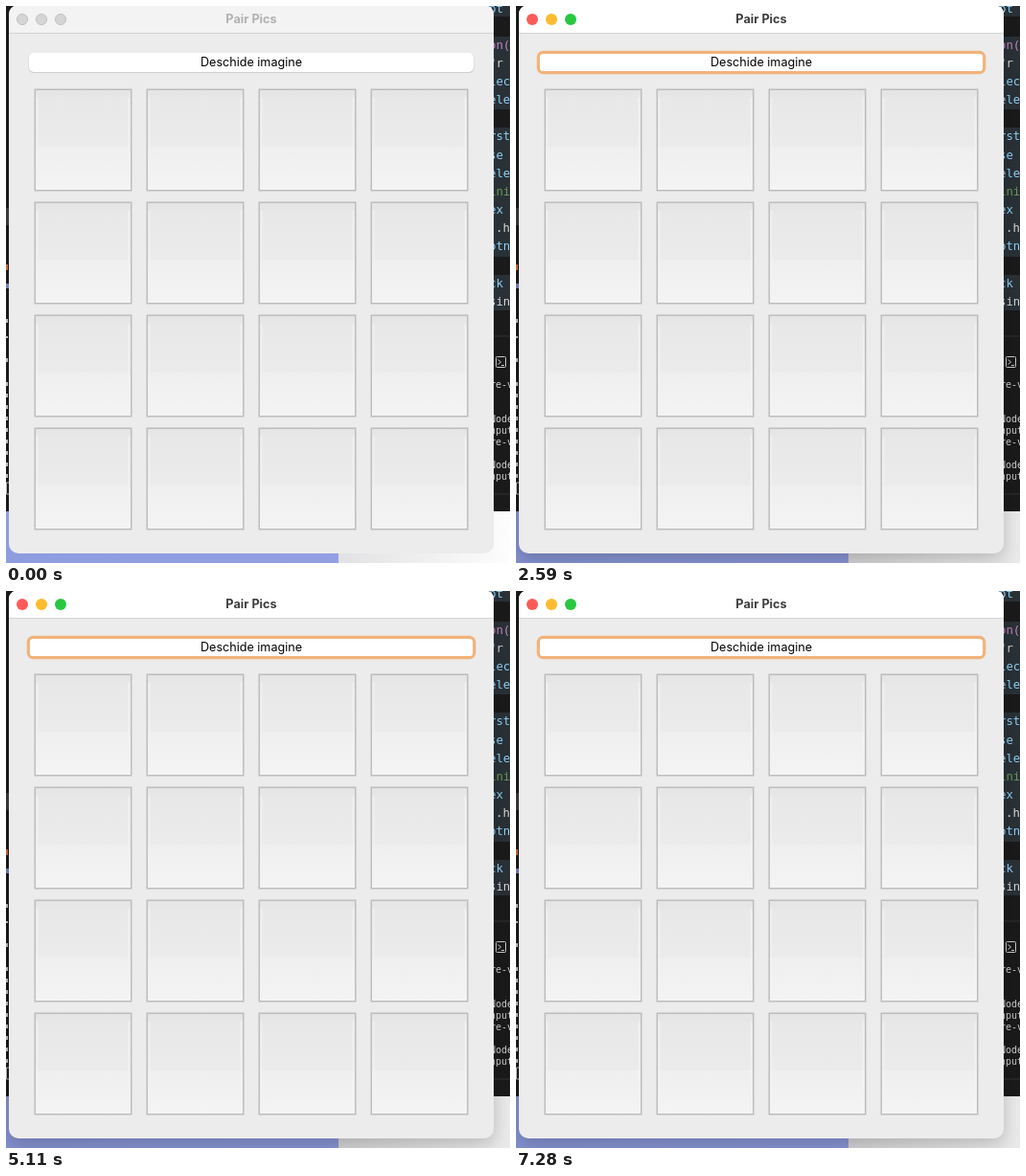
An HTML page for the animation above (7.63 s loop, 526 by 582 pixels).

```html
<!DOCTYPE html>
<html lang="ro">
<head>
<meta charset="utf-8">
<title>Pair Pics</title>
<style>
  html, body { margin: 0; width: 100%; height: 100%; overflow: hidden; background: #1a1a1b; }
  svg { display: block; }
  text { white-space: pre; }
  .ui { font-family: Inter, "Liberation Sans", sans-serif; text-anchor: middle; }
  .code { font: 12.3px "DejaVu Sans Mono", "Noto Sans Mono", monospace; }
  .term { font: 10px "DejaVu Sans Mono", "Noto Sans Mono", monospace; fill: #d0d0d0; }
  .cue { opacity: 0; }
</style>
</head>
<body>
<svg width="526" height="582" viewBox="0 0 526 582">
  <defs>
    <linearGradient id="face" x2="0" y2="1">
      <stop offset="0" stop-color="#e4e4e4"/>
      <stop offset=".1" stop-color="#e8e8e8"/>
      <stop offset=".56" stop-color="#ebebeb"/>
      <stop offset=".57" stop-color="#efefef"/>
      <stop offset=".76" stop-color="#f1f1f1"/>
      <stop offset="1" stop-color="#f4f4f4"/>
    </linearGradient>
    <linearGradient id="desk">
      <stop offset="0" stop-color="#8e9ce0"/>
      <stop offset="1" stop-color="#929fe3"/>
    </linearGradient>
    <linearGradient id="page">
      <stop offset="0" stop-color="#e2e2e4"/>
      <stop offset="1" stop-color="#fdfdfd"/>
    </linearGradient>
    <filter id="soft" x="-10%" y="-10%" width="120%" height="120%">
      <feGaussianBlur stdDeviation="9"/>
    </filter>
    <filter id="water" x="0" y="0" width="1" height="1" color-interpolation-filters="sRGB">
      <feTurbulence type="turbulence" baseFrequency=".034 .042" numOctaves="3" seed="8"/>
      <feColorMatrix values="1 0 0 0 0  1 0 0 0 0  1 0 0 0 0  0 0 0 0 1"/>
      <feComponentTransfer>
        <feFuncR type="table" tableValues=".14 .12 .11 .11 .11 .12"/>
        <feFuncG type="table" tableValues=".42 .26 .19 .17 .16 .16"/>
        <feFuncB type="table" tableValues=".47 .36 .3 .28 .27 .27"/>
      </feComponentTransfer>
    </filter>
    <filter id="stone" x="0" y="0" width="1" height="1" color-interpolation-filters="sRGB">
      <feTurbulence type="fractalNoise" baseFrequency=".07" numOctaves="4" seed="5"/>
      <feColorMatrix values="1 0 0 0 0  1 0 0 0 0  1 0 0 0 0  0 0 0 0 1"/>
      <feComponentTransfer>
        <feFuncR type="linear" slope=".46" intercept=".19"/>
        <feFuncG type="linear" slope=".42" intercept=".115"/>
        <feFuncB type="linear" slope=".38" intercept=".09"/>
      </feComponentTransfer>
    </filter>
    <filter id="grain" x="0" y="0" width="1" height="1" color-interpolation-filters="sRGB">
      <feTurbulence type="fractalNoise" baseFrequency=".025 .14" numOctaves="2" seed="3"/>
      <feColorMatrix values="1 0 0 0 0  1 0 0 0 0  1 0 0 0 0  0 0 0 0 1"/>
      <feComponentTransfer>
        <feFuncR type="linear" slope=".2" intercept=".5"/>
        <feFuncG type="linear" slope=".2" intercept=".455"/>
        <feFuncB type="linear" slope=".17" intercept=".325"/>
      </feComponentTransfer>
    </filter>
    <clipPath id="frame"><rect width="114" height="114"/></clipPath>

    <g id="tile">
      <rect x=".75" y=".75" width="100.5" height="105.5" fill="url(#face)" stroke="#bdbdbd" stroke-width="1.5"/>
      <path d="M3 9V104M99 9V104" stroke="#f3f3f3" stroke-width="2" opacity=".7"/>
    </g>
    <g id="press">
      <rect x=".75" y=".75" width="100.5" height="105.5" fill="#c1c1c1" stroke="#b0b0b0" stroke-width="1.5"/>
      <rect x="2" y="2" width="98" height="95" rx="5" fill="#b9b9b9"/>
      <path d="M1.5 1.5H100.5V51H1.5Z" fill="#b2b2b2"/>
    </g>
    <g id="sea"><rect width="114" height="115" filter="url(#water)"/></g>
    <g id="disc">
      <rect width="114" height="114" filter="url(#stone)"/>
      <circle cx="63" cy="61" r="21" fill="#463530"/>
    </g>
    <g id="fishing">
      <rect width="114" height="114" filter="url(#grain)"/>
      <path d="M0 0H11Q12 7 6 9T3 16L0 18ZM0 94Q5 92 4 100T9 108L11 114H0Z" fill="#675143"/>
      <path d="M46 25Q62 18 78 27L92 35 90 41 76 39Q66 44 58 37T46 25Z" fill="#ad6241"/>
      <path d="M62 34l8 3 8-2M52 42q8-9 17-3" fill="none" stroke="#c1aa80" stroke-width="2" stroke-dasharray="3 2"/>
      <path d="M30 57Q36 37 48 25M43 47Q51 31 68 42T78 89" fill="none" stroke="#776b4b" stroke-width="1.3"/>
      <path d="M33 55l6 1 2 6 6 6-3 3-4-4-1 11 6 6-1 3-8-3-3 14-6-1 2-16-5-13 5-6Z" fill="#7c6b4b"/>
      <path d="M73 82l6 2 1 8-6-3Z" fill="#7c6b4b"/>
    </g>
    <g id="lace">
      <rect width="114" height="115" fill="#00007c"/>
      <g id="rings" clip-path="url(#frame)"/>
      <path d="M1 0V115" stroke="#777" stroke-width="2"/>
    </g>
  </defs>

  <rect width="526" height="582" fill="#1a1a1b"/>
  <path d="M505 0H526V11H505ZM505 32H526V108H505ZM505 127H526V262H505ZM505 281H526V318H505Z" fill="#293137"/>
  <path d="M505 345H526M505 510H526" stroke="#333"/>
  <g id="code"></g>
  <g fill="none" stroke="#c8c8c8">
    <rect x="511.5" y="366.5" width="10" height="11" rx="1"/>
    <path d="M513.5 369.5l3 2.5-3 2.5M517 375.5h3"/>
  </g>
  <path d="M0 211H3V229H0Z" fill="#3a3a3a"/>
  <path d="M0 270H2V276H0Z" fill="#c96a3d"/>
  <path d="M0 290H3V295H0Z" fill="#777fb5"/>
  <path d="M1 327V333M1 345V347M1 368V372M1 393V500" stroke="#bbb" stroke-width="2" stroke-dasharray="4 8"/>
  <path d="M3 498H.5V510H3" fill="none" stroke="#bbb"/>
  <rect y="528" width="347" height="54" fill="url(#desk)"/>
  <rect x="347" y="528" width="179" height="54" fill="url(#page)"/>
  <g class="cue" data-on="1050">
    <rect y="528" width="526" height="54" opacity=".08"/>
    <rect x="3" y="16" width="506" height="562" rx="10" filter="url(#soft)" opacity=".18"/>
  </g>

  <rect x="3" y="-1" width="506" height="573" rx="10" fill="#ececec"/>
  <path d="M3 28V9Q3 0 12 0H500Q509 0 509 9V28Z" fill="#f3f3f3"/>
  <g fill="#d5d5d5" stroke="#c2c2c2">
    <circle cx="17" cy="14" r="5.6"/><circle cx="37" cy="14" r="5.6"/><circle cx="57" cy="14" r="5.6"/>
  </g>
  <text class="ui" x="256" y="18" font-size="12.7" font-weight="700" fill="#b1b1b1">Pair Pics</text>
  <rect x="23.5" y="49.5" width="465" height="20.5" rx="5" fill="#cfcfcf"/>
  <rect x="24" y="49" width="464" height="20" rx="5" fill="#fff"/>

  <g class="cue" data-on="1050">
    <path d="M3 28V9Q3 0 12 0H500Q509 0 509 9V28Z" fill="#fff"/>
    <circle cx="17" cy="14" r="6" fill="#fc5b57"/>
    <circle cx="37" cy="14" r="6" fill="#fdbb2e"/>
    <circle cx="57" cy="14" r="6" fill="#28c840"/>
    <text class="ui" x="256" y="18" font-size="12.7" font-weight="700" fill="#3d3d3d">Pair Pics</text>
    <rect x="23.3" y="48.3" width="465.4" height="21.4" rx="5" fill="#fff" stroke="#f1b37a" stroke-width="3.2"/>
  </g>
  <path d="M3 28.5H509" stroke="#d3d3d3"/>
  <text class="ui" x="256" y="63" font-size="12.6">Deschide imagine</text>
  <g id="board"></g>
</svg>
<script>
const LOOP = 7630;
const NS = 'http://www.w3.org/2000/svg';
const $ = id => document.getElementById(id);

function add(parent, tag, attrs, text) {
  const el = document.createElementNS(NS, tag);
  for (const key in attrs) el.setAttribute(key, attrs[key]);
  if (text) el.textContent = text;
  parent.append(el);
  return el;
}

// Editor and terminal text peeking out on the right: [text, baseline, colour]
[
  ['bt', 7, '#8fd0f5'], ['on(', 45, '#c586c0'], ['"r', 64, '#ded5cc'],
  ['lec', 83, '#8fd0f5'], ['ele', 102, '#8fd0f5'], ['rst_', 140, '#8fd0f5'],
  ['se', 160, '#8fd0f5'], ['ele', 179, '#8fd0f5'], ['ini', 198, '#6a9955'],
  ['ex', 217, '#8fd0f5'], ['.h', 236, '#d4d4d4'], ['otn', 255, '#8fd0f5'],
  ['ck', 294, '#8fd0f5'], ['sin', 313, '#d4d4d4']
].forEach(([text, y, fill]) =>
  add($('code'), 'text', { class: 'code', x: text === '.h' ? 511 : 504, y, fill }, text));
[['re-v', 399], ['Node', 435], ['nput', 447], ['re-v', 459], ['Node', 483], ['nput', 495]]
  .forEach(([text, y]) => add($('code'), 'text', { class: 'term', x: 505, y }, text));

// Four-lobed outline used for the lace pattern
function lobes(cx, cy, size, turn) {
  const pts = [];
  for (let i = 0; i < 128; i++) {
    const a = i / 64 * Math.PI;
    const r = size * (.8 + .18 * Math.cos(4 * (a - turn)) + .035 * Math.cos(16 * a));
    pts.push((cx + r * Math.cos(a)).toFixed(1) + ',' + (cy + r * Math.sin(a)).toFixed(1));
  }
  return pts.join(' ');
}

function nest(cx, cy, sizes, turn) {
  sizes.forEach((size, i) => add($('rings'), 'polygon', {
    points: lobes(cx, cy, size, turn), fill: i % 2 ? '#00007c' : '#0000f0'
  }));
}

for (const x of [2, 114]) for (const y of [0, 114])
  nest(x, y, [47, 43, 39, 33, 28, 24, 18, 13, 7], Math.PI / 4);
nest(58, 57, [50, 48, 45, 31, 29, 20, 17, 7], 0);

const colX = c => 29.5 + 117 * c;
const rowY = r => 86.5 + 118 * r;
const board = $('board');
for (let r = 0; r < 4; r++) for (let c = 0; c < 4; c++)
  add(board, 'use', { href: '#tile', x: colX(c), y: rowY(r) });

// [picture, row, column, pressed, shown, hidden]
[
  ['disc', 2, 2, 1050, 1120, 2590],
  ['fishing', 2, 1, 1470, 1540, 2590],
  ['sea', 0, 0, 2870, 3010, 5110],
  ['fishing', 0, 2, 3920, 4060, 5110],
  ['lace', 0, 3, 5390, 5460, 7210],
  ['disc', 3, 1, 6090, 6160, 7210]
].forEach(([pic, r, c, down, on, off]) => {
  add(board, 'use', { href: '#press', class: 'cue', 'data-on': down, 'data-off': on, x: colX(c), y: rowY(r) });
  add(board, 'use', { href: '#' + pic, class: 'cue', 'data-on': on, 'data-off': off,
    x: 24 + 117 * c + (c === 0), y: 83.5 + 118 * r | 0 });
});

// Hard switches within the loop
for (const el of document.querySelectorAll('.cue')) {
  const { on, off = LOOP } = el.dataset;
  const easing = 'steps(1, end)';
  el.animate([
    { opacity: 0, offset: 0, easing },
    { opacity: 1, offset: on / LOOP, easing },
    { opacity: 0, offset: off / LOOP, easing },
    { opacity: 0, offset: 1 }
  ], { duration: LOOP, iterations: Infinity });
}
</script>
</body>
</html>
```
